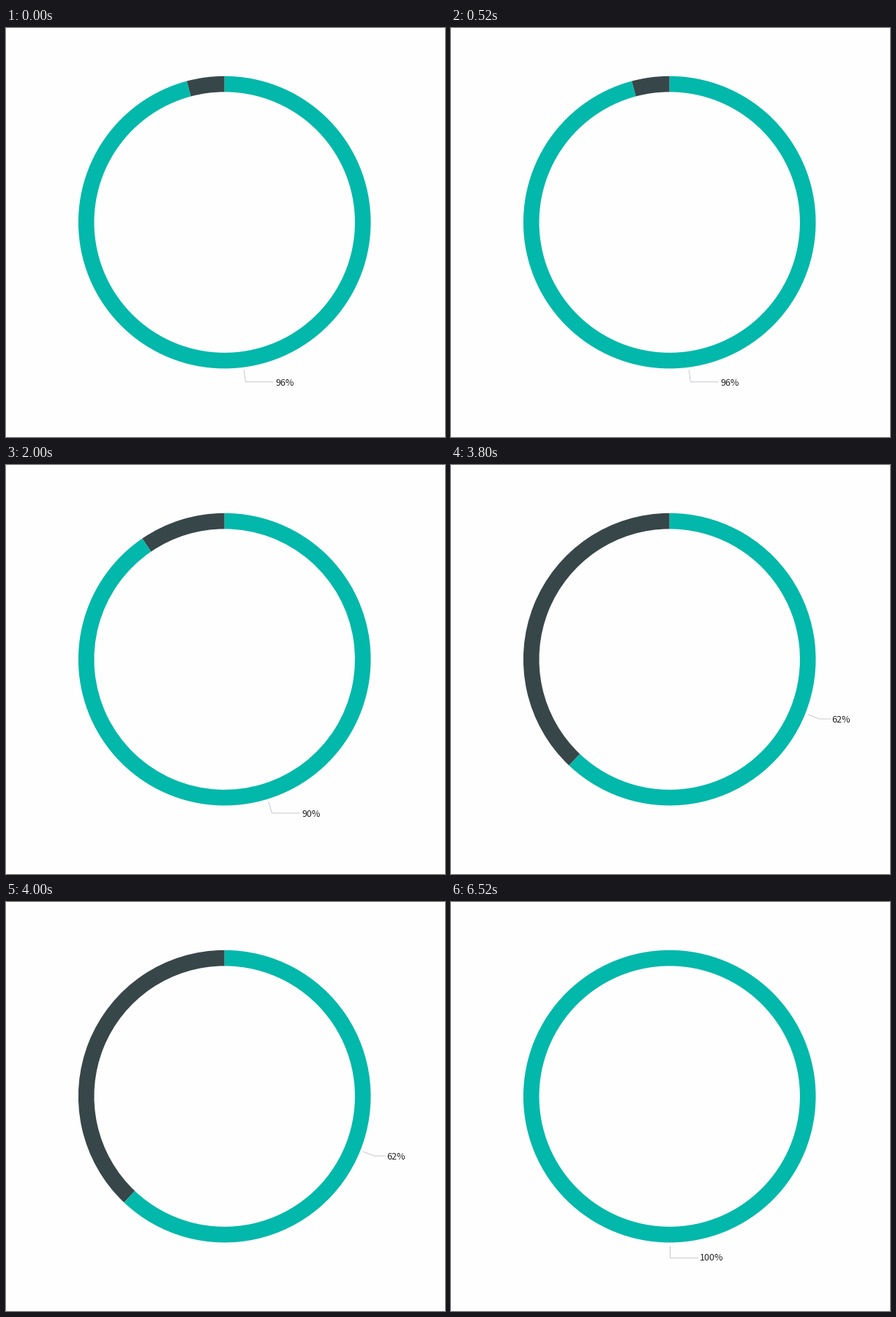
A matplotlib script for the animation above (7.96 s loop, 600 by 559 pixels).

```python
import numpy as np
import matplotlib.pyplot as plt
from matplotlib.animation import FuncAnimation
from matplotlib.patches import Wedge

W, H, DPI = 600, 559, 100
STEP, LOOP = 40, 7960
PX = 72 / DPI  # one pixel in points

TEAL, SLATE, LEADER, INK, PAPER = "#01b8aa", "#374649", "#c9c9d1", "#252423", "#fefefe"
CX, CY = 298.7, 265.6
R_OUT, R_IN = 199.8, 178.2
R_LINE, R_ELBOW = 204, 220

# start in ms, filled share, leader length, gap before the label
STATES = [
    (0, 23 / 24, 37.5, 3.5),
    (1520, 19 / 21, 37.5, 3.5),
    (3800, 18 / 29, 15.5, 2.0),
    (6400, 1.0, 38.0, 3.5),
]

fig = plt.figure(figsize=(W / DPI, H / DPI), dpi=DPI, facecolor=PAPER)
ax = fig.add_axes([0, 0, 1, 1])
ax.set_xlim(0, W)
ax.set_ylim(H, 0)
ax.axis("off")


def ring(color):
    wedge = Wedge((CX, CY), R_OUT, -90, 270, width=R_OUT - R_IN, fc=color, lw=0)
    return ax.add_patch(wedge)


rest, filled = ring(SLATE), ring(TEAL)
leader, = ax.plot([], [], color=LEADER, lw=PX, solid_joinstyle="miter")
label = ax.text(0, 0, "", family="Noto Sans CJK JP", size=12.5 * PX,
                color=INK, ha="left", va="baseline")


def polar(radius, turn):
    """Point at a clockwise turn (0 to 1) from twelve o'clock."""
    a = 2 * np.pi * turn
    return CX + radius * np.sin(a), CY - radius * np.cos(a)


def draw(i):
    _, share, length, gap = [s for s in STATES if s[0] <= i * STEP][-1]
    split = -90 + 360 * share

    filled.set_theta2(split)
    rest.set_theta1(split)
    rest.set_visible(share < 1)

    x0, y0 = polar(R_LINE, share / 2)
    x1, y1 = polar(R_ELBOW, share / 2)
    x2 = x1 + length
    leader.set_data([x0, x1, x2], [y0, y1, y1])
    label.set_position((x2 + gap, y1 + 4.9))
    label.set_text(f"{share:.0%}")
    return rest, filled, leader, label


anim = FuncAnimation(fig, draw, frames=LOOP // STEP, interval=STEP,
                     repeat=True, repeat_delay=0)
plt.show()
```
